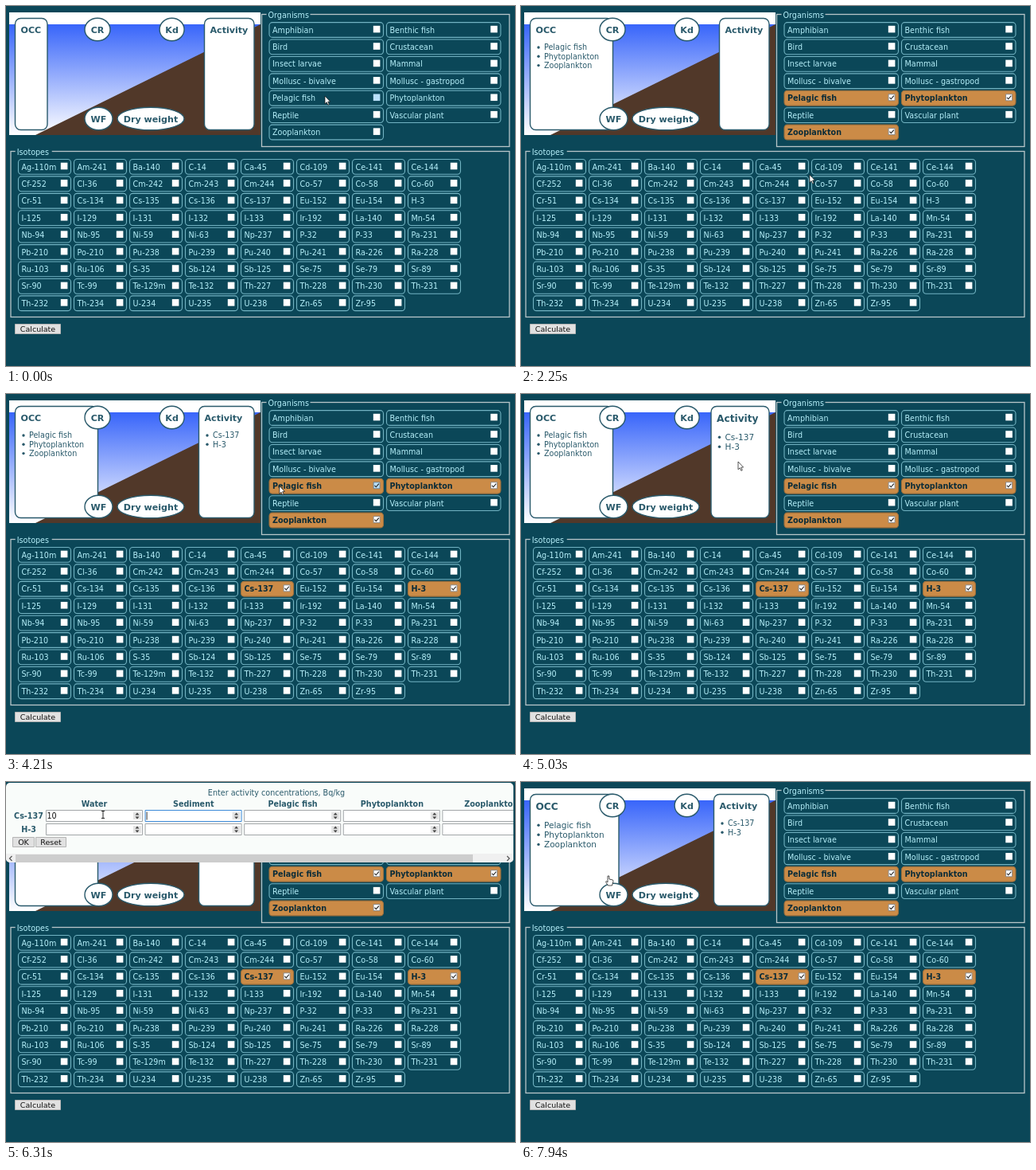
An HTML page with a canvas for the animation above (8000 ms loop, 640 by 452 pixels).

```html
<!DOCTYPE html>
<html lang="en">
<head>
<meta charset="utf-8">
<title>Activity calculator</title>
<style>
html, body { margin: 0; width: 100%; height: 100%; overflow: hidden; background: #0b4758; }
canvas { display: block; }
</style>
</head>
<body>
<canvas id="stage" width="640" height="452"></canvas>
<script>
const ctx = document.getElementById('stage').getContext('2d');
const LOOP = 8000, STEP = 77.7;
const INK = '#2a5a6b', PALE = '#b6f0fa', LINE = '#72b3c2', PAGE = '#0b4758';

const organisms = ['Amphibian', 'Benthic fish', 'Bird', 'Crustacean', 'Insect larvae', 'Mammal',
  'Mollusc - bivalve', 'Mollusc - gastropod', 'Pelagic fish', 'Phytoplankton', 'Reptile',
  'Vascular plant', 'Zooplankton'];
const isotopes = ('Ag-110m Am-241 Ba-140 C-14 Ca-45 Cd-109 Ce-141 Ce-144 Cf-252 Cl-36 Cm-242 Cm-243 ' +
  'Cm-244 Co-57 Co-58 Co-60 Cr-51 Cs-134 Cs-135 Cs-136 Cs-137 Eu-152 Eu-154 H-3 I-125 I-129 I-131 ' +
  'I-132 I-133 Ir-192 La-140 Mn-54 Nb-94 Nb-95 Ni-59 Ni-63 Np-237 P-32 P-33 Pa-231 Pb-210 Po-210 ' +
  'Pu-238 Pu-239 Pu-240 Pu-241 Ra-226 Ra-228 Ru-103 Ru-106 S-35 Sb-124 Sb-125 Se-75 Se-79 Sr-89 ' +
  'Sr-90 Tc-99 Te-129m Te-132 Th-227 Th-228 Th-230 Th-231 Th-232 Th-234 U-234 U-235 U-238 Zn-65 Zr-95').split(' ');

// Moment each choice is ticked
const checkedAt = { 'Pelagic fish': 1000, Phytoplankton: 1540, Zooplankton: 1855, 'Cs-137': 2550, 'H-3': 2860 };
// Typed values in order; each keeps the focus until the next one takes it
const entries = [
  { col: 0, row: 0, value: '10', focusAt: 5480, typeAt: 5640 },
  { col: 1, row: 0, value: '2500', focusAt: 6300, typeAt: 6380 },
  { col: 2, row: 0, value: '450', focusAt: 6690, typeAt: 6770 },
  { col: 0, row: 1, value: '1000', focusAt: 7070, typeAt: 7150 }
];
const FORM_OPEN = 5175, OK_PRESS = 7600, FORM_CLOSE = 7775;
const bursts = [1000, 1860, 2710, 3910, 4870, 5740, 6310, 7160];
// Pointer path: time, x, y
const path = [
  [1000, 401, 113], [1450, 529, 113], [1540, 529, 113], [1770, 413, 157], [1930, 413, 157],
  [2470, 328, 250], [2700, 328, 250], [2780, 522, 250], [2860, 522, 250], [3015, 360, 123],
  [3905, 360, 123], [4600, 313, 101], [4800, 313, 101], [5020, 273, 85], [5175, 273, 85],
  [5480, 122, 41], [6920, 122, 41], [7070, 115, 59], [7390, 115, 59], [7620, 22, 77],
  [7775, 22, 77], [7930, 110, 118]
];

// The picture only changes in short bursts of even steps
function tick(t) {
  const start = bursts.filter(b => b <= t).pop();
  return start === undefined ? t : start + Math.floor((t - start + 6) / STEP) * STEP;
}

function pointerAt(t) {
  const next = path.findIndex(p => p[0] > t);
  if (next === 0) return path[0].slice(1);
  if (next < 0) return path[path.length - 1].slice(1);
  const [t0, x0, y0] = path[next - 1], [t1, x1, y1] = path[next];
  const k = (t - t0) / (t1 - t0);
  return [x0 + (x1 - x0) * k, y0 + (y1 - y0) * k];
}

function text(str, x, y, { size = 9.6, bold = false, color = INK, align = 'left' } = {}) {
  ctx.font = `${bold ? 'bold ' : ''}${size}px "DejaVu Sans", sans-serif`;
  ctx.fillStyle = color;
  ctx.textAlign = align;
  ctx.fillText(str, x, y);
}

function rect(x, y, w, h, fill) {
  ctx.fillStyle = fill;
  ctx.fillRect(x, y, w, h);
}

function paint(fill, stroke, width = 1) {
  if (fill) { ctx.fillStyle = fill; ctx.fill(); }
  if (stroke) { ctx.strokeStyle = stroke; ctx.lineWidth = width; ctx.stroke(); }
}

function box(x, y, w, h, r, fill, stroke, width) {
  ctx.beginPath();
  ctx.roundRect(x, y, w, h, r);
  paint(fill, stroke, width);
}

function shape(points, fill, stroke, width, closed = true) {
  ctx.beginPath();
  points.forEach(([x, y]) => ctx.lineTo(x, y));
  if (closed) ctx.closePath();
  paint(fill, stroke, width);
}

function oval(label, x, y, rx) {
  ctx.beginPath();
  ctx.ellipse(x, y, rx, 14.3, 0, 0, 7);
  paint('#fff', INK, 1.4);
  text(label, x, y + 4, { size: 11.1, bold: true, align: 'center' });
}

function panel(title, left, right, names, big) {
  box(left, 15.5, right - left, 140, 7, '#fff', INK, 1.4);
  text(title, left + 7, big ? 35 : 34, { size: big ? 12.2 : 11.1, bold: true });
  names.forEach((name, i) => {
    const y = big ? 57.5 + i * 12.1 : 55.3 + i * 11.3;
    ctx.beginPath();
    ctx.arc(left + 10.5, y - 3.3, 1.7, 0, 7);
    paint(INK);
    text(name, left + 17.5, y, { size: big ? 10.5 : 9.6 });
  });
}

function scene(t, x, y, formOpen) {
  const chosen = list => list.filter(name => t >= checkedAt[name]);
  const fish = chosen(organisms), atoms = chosen(isotopes);
  const over = (a, b) => !formOpen && x > a && x < b && y > 15 && y < 155;

  rect(4, 8, 316, 154, '#fff');
  const water = ctx.createLinearGradient(0, 23, 0, 162);
  water.addColorStop(0, '#3865fa');
  water.addColorStop(1, '#fff');
  rect(4, 23, 316, 139, water);
  shape([[37, 162], [320, 23], [320, 162]], '#513829');

  const bigOcc = over(12, 116) && t > FORM_CLOSE, bigActivity = over(243, 312);
  panel('OCC', 11.5, bigOcc ? 123 : [52, 101, 115.5, 115.5][fish.length], fish, bigOcc);
  panel('Activity', bigActivity ? 239 : atoms.length ? 242.5 : 249.5, 312, atoms, bigActivity);
  oval('CR', 115, 29.5, 16);
  oval('Kd', 208.6, 29.5, 15.5);
  oval('WF', 116.5, 141.5, 17.5);
  oval('Dry weight', 182, 141.5, 42);
}

function group(title, x, y, w, h, titleX, titleW) {
  ctx.strokeStyle = '#b9c6c9';
  ctx.lineWidth = 1.3;
  ctx.strokeRect(x, y, w, h);
  rect(titleX - 2, y - 3, titleW + 3, 6, PAGE);
  text(title, titleX, y + 4, { color: PALE });
}

function option(name, x, y, w, t, hover) {
  const on = t >= checkedAt[name];
  box(x + .5, y - 9.4, w, 18.8, 4, on ? '#cb8b47' : null, on ? '#9a6e3c' : LINE, 1.1);
  text(name, x + 4.5, y + 3.6, { bold: on, color: on ? '#0b2c38' : PALE });
  const cx = x + w - 12.2, cy = y - 5.2, side = 8.6;
  rect(cx, cy, side, side, hover ? '#b9e0fa' : '#fff');
  if (on) {
    box(cx + .3, cy + .3, side - .6, side - .6, 0, null, '#444', .6);
    shape([[cx + 1.7, cy + 4.3], [cx + 3.5, cy + 6.3], [cx + 7, cy + 2.2]], null, '#222', 1.1, false);
  }
}

function options(names, cols, x0, y0, pitch, w, t, x, y) {
  names.forEach((name, i) => {
    const ox = x0 + i % cols * pitch, oy = y0 + Math.floor(i / cols) * 21.42;
    option(name, ox, oy, w, t, x > ox && x < ox + w && Math.abs(y + 4 - oy) < 10.7);
  });
}

function button(label, x, y, w, h, active) {
  box(x + .5, y + .5, w - 1, h - 1, 0, active ? '#cce4f7' : '#e1e1e1', active ? '#1c6fb5' : '#b5b5b5', active ? 1.5 : 1);
  text(label, x + w / 2, y + h - 3.2, { size: 9.5, color: '#111', align: 'center' });
}

function field(col, row, t) {
  const x = 50 + col * 124.6, y = 35 + row * 17;
  const index = entries.findIndex(e => e.col === col && e.row === row);
  const entry = entries[index], next = entries[index + 1];
  const touched = entry && t >= entry.focusAt;
  const focused = touched && t < (next ? next.focusAt : OK_PRESS);

  box(x + .5, y + .5, 121, 14, 0, '#fff', focused ? '#3c8ad8' : '#a2a6a8');
  rect(x + 110, y + 3, 10, 9, '#e4e4e4');
  shape([[x + 112.5, y + 6.5], [x + 115, y + 3.5], [x + 117.5, y + 6.5]], '#444');
  shape([[x + 112.5, y + 8.5], [x + 115, y + 11.5], [x + 117.5, y + 8.5]], '#444');

  if (!touched) return;
  const typed = entry.value.slice(0, Math.max(0, Math.floor((t - entry.typeAt) / STEP) + 1));
  text(typed, x + 1.5, y + 11.2, { color: '#111' });
  if (focused && t - entry.typeAt < 250) rect(x + 2 + ctx.measureText(typed).width, y + 2.5, 1, 10, '#333');
}

function form(t) {
  ctx.save();
  ctx.beginPath();
  ctx.roundRect(0, 1, 638, 100, 5);
  ctx.clip();
  rect(0, 0, 640, 102, '#f9fcfa');
  text('Enter activity concentrations, Bq/kg', 340, 17.4, { align: 'center' });
  ['Water', 'Sediment', 'Pelagic fish', 'Phytoplankton', 'Zooplankton'].forEach((head, col) => {
    text(head, 111 + col * 124.8, 31, { bold: true, align: 'center' });
    field(col, 0, t);
    field(col, 1, t);
  });
  text('Cs-137', 28.5, 46, { bold: true, align: 'center' });
  text('H-3', 28.5, 63, { bold: true, align: 'center' });
  button('OK', 8, 69, 28, 13, t > OK_PRESS);
  button('Reset', 37, 69, 39, 13);
  rect(0, 90, 638, 12, '#f0f0f0');
  rect(12, 91, 575, 10, '#cdcdcd');
  shape([[7.5, 93], [4.5, 96], [7.5, 99]], null, '#555', 1.2, false);
  shape([[630, 93], [633, 96], [630, 99]], null, '#555', 1.2, false);
  ctx.restore();
}

function pointer(x, y, t) {
  ctx.save();
  ctx.translate(x, y);
  if (t < 5400) {
    shape([[0, 0], [0, 9.8], [2.2, 7.8], [3.8, 11.3], [5.3, 10.6], [3.8, 7.2], [6.6, 7]], '#fff', '#111', .7);
  } else if (t < 7450) {
    rect(-.5, -4.5, 1, 9, '#222');
    rect(-2, -5, 4, 1, '#222');
    rect(-2, 4, 4, 1, '#222');
  } else {
    shape([[-1, 0], [.8, 0], [1, 4], [5.5, 5], [6, 6.5], [5, 10], [4.5, 12], [-.5, 12],
      [-3.4, 7.5], [-2.8, 6.4], [-1, 8]], '#fff', '#222', .8);
  }
  ctx.restore();
}

function draw(now) {
  const t = tick(now % LOOP);
  const [x, y] = pointerAt(t);
  const formOpen = t >= FORM_OPEN && t < FORM_CLOSE;
  rect(0, 0, 640, 452, PAGE);
  scene(t, x, y, formOpen);
  group('Organisms', 321.5, 10.5, 311.5, 166, 329.5, 52);
  options(organisms, 2, 330.5, 30, 147.5, 143.5, t, x, y);
  group('Isotopes', 6, 182.5, 627, 208, 13.7, 43);
  options(isotopes, 8, 15, 201.9, 70, 66, t, x, y);
  button('Calculate', 11, 399, 58, 13);
  if (formOpen) form(t);
  pointer(x, y, t);
  requestAnimationFrame(() => draw(performance.now()));
}

draw(0);
</script>
</body>
</html>
```
